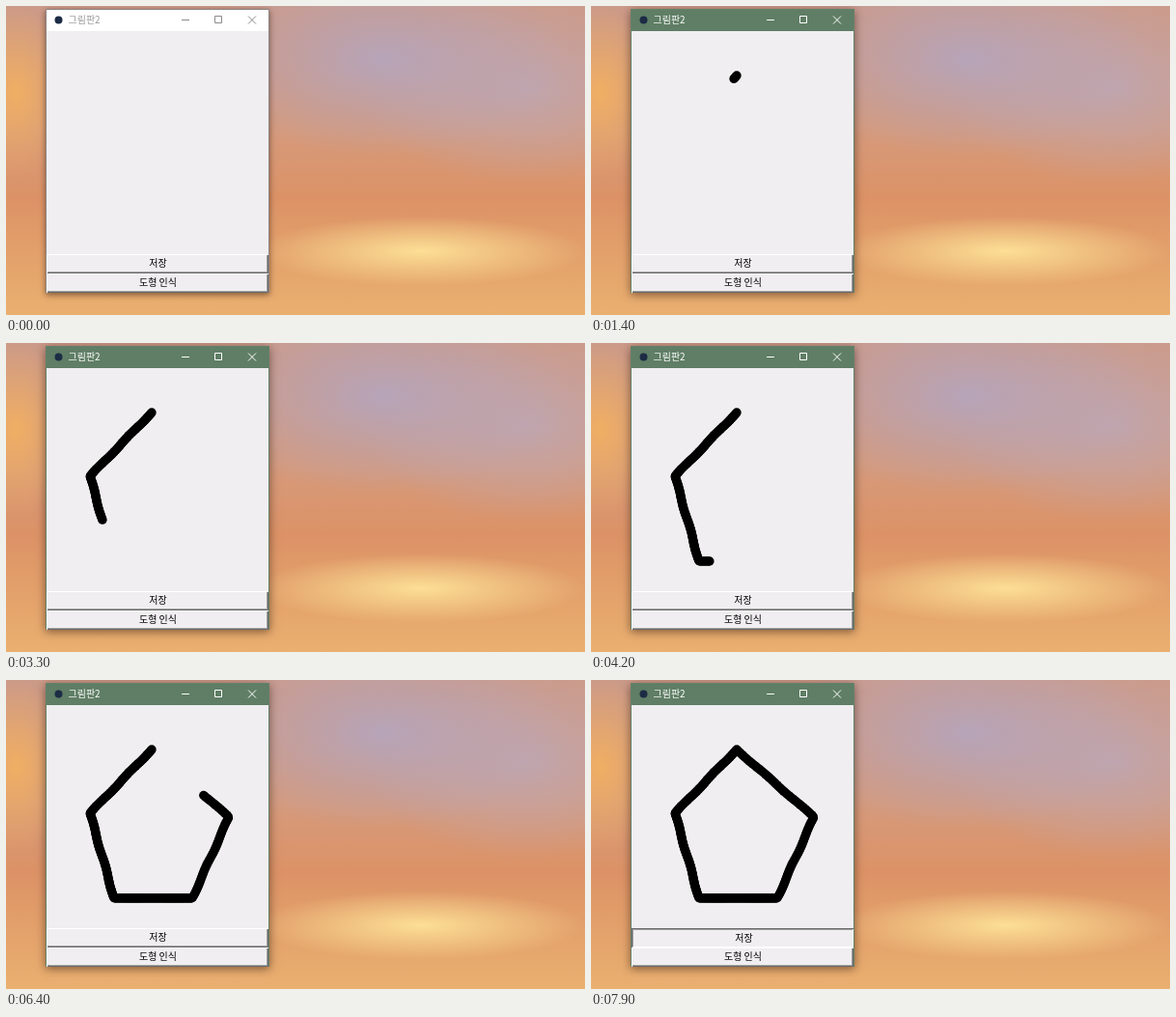
An HTML page with a canvas that plays this animation: 600 px wide and 320 px high, repeating every 8000 ms.

```html
<!DOCTYPE html>
<html lang="ko">
<head>
<meta charset="utf-8">
<style>
  html, body { margin: 0; width: 100%; height: 100%; overflow: hidden; }
  body {
    background:
      radial-gradient(170px 36px at 430px 254px, #ffe69ae6, #ffd87a00),
      radial-gradient(190px 100px at 390px 55px, #b3a5bee6, #b3a5be00),
      radial-gradient(170px 100px at 540px 85px, #bca8b8cc, #bca8b800),
      radial-gradient(60px 90px at 10px 90px, #f8b45ccc, #f8b45c00),
      linear-gradient(#cc9a88, #d59a7c 40%, #dc9266 62%, #eab070);
  }
  canvas { display: block; width: 600px; height: 320px; }
</style>
</head>
<body>
<canvas id="stage" width="600" height="320"></canvas>
<script>
const LOOP = 8000, STEP = 100, PRESS_AT = 7700, DAB = 20;
const FACE = '#f0eef0', DARK = '#696969';
const FONT = '10px "Noto Sans CJK KR", "Noto Sans CJK", "Noto Sans CJK JP", sans-serif';
const ctx = document.getElementById('stage').getContext('2d');

// Pentagon corners in drawing order, with the time the pen reaches each
const corners = [
  { x: 151, y: 72, t: 1340 },
  { x: 87, y: 138, t: 2510 },
  { x: 112, y: 226, t: 4050 },
  { x: 193, y: 226, t: 5230 },
  { x: 231, y: 142, t: 6110 },
  { x: 152, y: 73, t: 7000 }
];
const start = corners[0].t, end = corners.at(-1).t;

function penAt(t) {
  const i = corners.findIndex(c => c.t >= t) || 1;
  const a = corners[i - 1], b = corners[i];
  const k = (t - a.t) / (b.t - a.t);
  const wobble = Math.sin(k * Math.PI * 4) * .6;
  return [a.x + (b.x - a.x) * k + wobble, a.y + (b.y - a.y) * k];
}

function box(color, x, y, w, h) {
  ctx.fillStyle = color;
  ctx.fillRect(x, y, w, h);
}

function dot(color, x, y, r) {
  ctx.fillStyle = color;
  ctx.beginPath();
  ctx.arc(x, y, r, 0, 2 * Math.PI);
  ctx.fill();
}

function label(text, x, y, color, align = 'center') {
  ctx.font = FONT;
  ctx.fillStyle = color;
  ctx.textAlign = align;
  ctx.fillText(text, x, y);
}

function drawButton(text, y, pressed) {
  const shift = pressed ? 1 : 0;
  box(pressed ? DARK : '#fff', 42, y, 230, 20);
  box(pressed ? '#fff' : DARK, 43, y + 1, 229, 19);
  box('#a0a0a0', 43, y + 1, 228, 18);
  box(FACE, 43 + shift, y + 1 + shift, 227, 17);
  label(text, 157.5 + shift, y + 13 + shift, '#000');
}

function drawTitle(active) {
  box(active ? '#5f7e65' : '#fff', 42, 4, 230, 22);
  dot('#1d2c45', 54.5, 14.5, 4);
  label('그림판2', 64.5, 18, active ? '#fff' : '#999', 'left');
  ctx.strokeStyle = active ? '#fff' : '#8c8c8c';
  ctx.beginPath();
  ctx.moveTo(182, 14.5);
  ctx.lineTo(190, 14.5);
  ctx.rect(216.5, 10.5, 7, 7);
  ctx.moveTo(251, 10.5);
  ctx.lineTo(259, 18.5);
  ctx.moveTo(259, 10.5);
  ctx.lineTo(251, 18.5);
  ctx.stroke();
}

function drawStroke(t) {
  for (let s = start; s <= Math.min(t, end); s += DAB) dot('#000', ...penAt(s), 4.7);
}

function drawWindow(active) {
  ctx.save();
  ctx.shadowColor = 'rgba(40,20,10,.55)';
  ctx.shadowBlur = active ? 9 : 6;
  ctx.shadowOffsetY = 2;
  box(active ? '#64806a' : '#8d8583', 41, 3, 232, 294);
  ctx.restore();
  box(FACE, 42, 26, 230, 270);
  drawTitle(active);
}

function draw(t) {
  ctx.clearRect(0, 0, 600, 320);
  drawWindow(t >= start);
  drawStroke(t);
  drawButton('저장', 257, t >= PRESS_AT);
  drawButton('도형 인식', 277, false);
}

function tick(now) {
  draw(Math.floor(now % LOOP / STEP) * STEP);
  requestAnimationFrame(tick);
}

requestAnimationFrame(tick);
</script>
</body>
</html>
```
